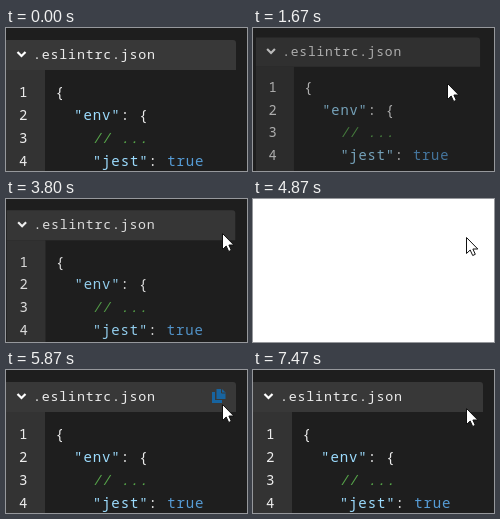
An HTML page that plays this animation: 241 px wide and 143 px high, repeating every 8000 ms.

```html
<!DOCTYPE html>
<html lang="en">
<head>
<meta charset="utf-8">
<style>
  html, body { margin: 0; height: 100%; overflow: hidden; background: #1e1e1e; }
  svg { display: block; width: 241px; height: 143px; }
  text { font-family: "Noto Sans Mono", "DejaVu Sans Mono", monospace; font-size: 14.1px; letter-spacing: .06em; fill: #ededed; white-space: pre; }
  .title { font-size: 13.3px; }
  .key { fill: #9cdcfe; font-weight: 500; }
  .note { fill: #57a64a; font-style: italic; }
  .bool { fill: #569cd6; }
</style>
</head>
<body>
<svg viewBox="0 0 241 143">
  <rect width="241" height="143" fill="#1e1e1e"/>
  <g id="panel">
    <path d="M0 12H227a3 3 0 0 1 3 3V42H0Z" fill="#383838"/>
    <rect y="42" width="39" height="110" fill="#333"/>
    <path d="M11.500 24l4 4 4-4" fill="none" stroke="#fff" stroke-width="2.2"/>
    <text class="title" x="27" y="31">.eslintrc.json</text>
    <g id="icon" fill="#1764a0">
      <path d="M206 22h3v8h7v3h-10Z"/>
      <path d="M210.500 19h5.500l3.500 3.500v6.500h-9Z"/>
      <path d="M215.500 19v4h4" fill="none" stroke="#383838"/>
    </g>
    <g id="code"></g>
  </g>
  <rect id="blank" width="241" height="143" fill="#fff"/>
  <path id="cursor" d="M.5.5V16.500L4.200 13l2.500 5.500 2.600-1.200L6.900 12H11.800Z" fill="#fff" stroke="#111"/>
</svg>
<script>
const LOOP = 8000, GLIDE = 200, PRESS = 340, DEPTH = .05;
const $ = id => document.getElementById(id);

const lines = [
  '{',
  '  <tspan class="key">"env"</tspan>: {',
  '    <tspan class="note">// ...</tspan>',
  '    <tspan class="key">"jest"</tspan>: <tspan class="bool">true</tspan>'
];
$('code').innerHTML = lines.map((line, i) => {
  const y = 68.5 + i * 23;
  return `<text x="13" y="${y}">${i + 1}</text><text x="49.500" y="${y}">${line}</text>`;
}).join('');

const entry = { x: 85, y: 143 };
const moves = [
  { at: 130, x: 229, y: 41 },
  { at: 330, x: 172, y: 68 },
  { at: 1470, x: 194, y: 55 },
  { at: 2600, x: 216, y: 34 },
  { at: 4070, x: 213, y: 38 },
  { at: 5400, x: 216, y: 34 },
  { at: 6330, x: 220, y: 20 },
  { at: 6610, x: 213, y: 38 }
];
const presses = [1585, 2530, 3500, 6070, 7130];

const ramp = (t, start, length) => Math.min(1, Math.max(0, (t - start) / length));
const swell = k => Math.sin(Math.PI * k) ** 2;

// Each move glides on from wherever the pointer has got to.
const pointer = t => moves.reduce((p, m) => {
  const k = ramp(t, m.at, GLIDE);
  return { x: p.x + (m.x - p.x) * k, y: p.y + (m.y - p.y) * k };
}, entry);

// A press shrinks and dims the panel, then lets it spring back.
const pressDip = t => DEPTH * presses.reduce((sum, start) => sum + swell(ramp(t, start, PRESS)), 0);

function draw(now) {
  const t = now % LOOP;
  const dip = pressDip(t);
  const { x, y } = pointer(t);
  $('panel').setAttribute('transform', `translate(${115 * dip} ${-90 * dip}) scale(${1 - dip})`);
  $('panel').setAttribute('opacity', 1 - 12 * dip);
  $('icon').setAttribute('opacity', ramp(t, 5300, 300) - ramp(t, 6200, 200));
  $('blank').setAttribute('opacity', t >= 4870 && t < 5000 ? 1 : 0);
  $('cursor').setAttribute('transform', `translate(${x} ${y})`);
  requestAnimationFrame(draw);
}
requestAnimationFrame(draw);
</script>
</body>
</html>
```
